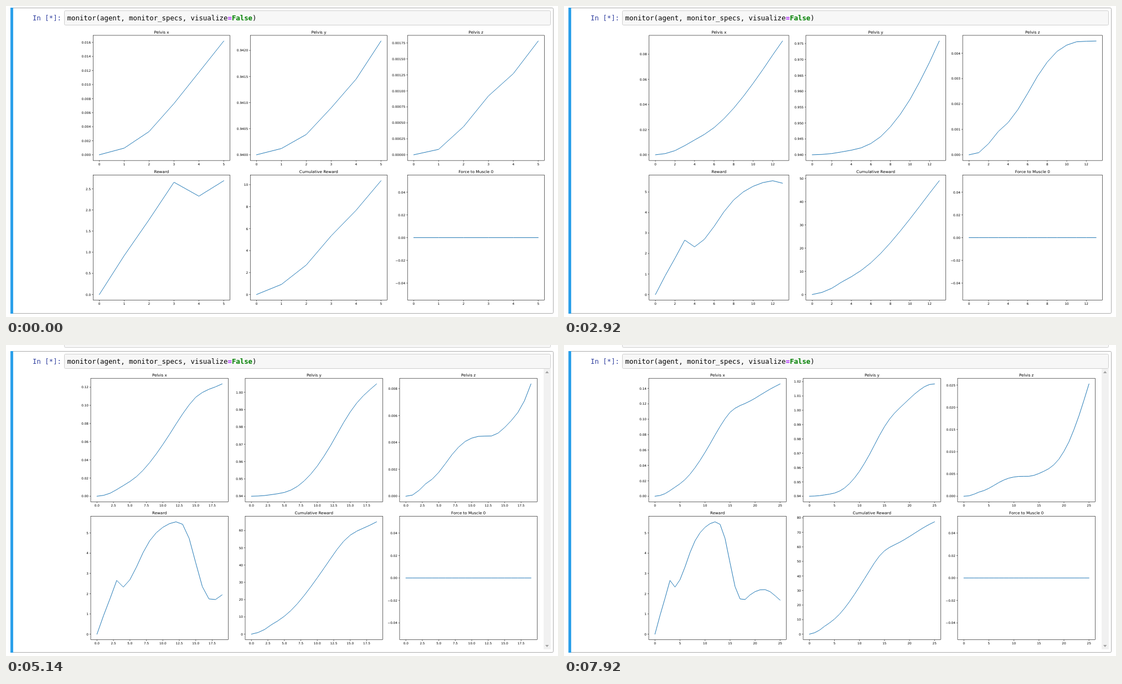
An HTML page that plays this animation: 997x562 px, repeating every 8 s.

```html
<!DOCTYPE html>
<html lang="en">
<head>
<meta charset="utf-8">
<title>Training monitor</title>
<style>
  html, body { margin: 0; width: 100%; height: 100%; overflow: hidden; background: #fff; }
  svg { display: block; width: 100%; height: 100%; }
  .code { font: 12.35px "DejaVu Sans Mono", monospace; white-space: pre; }
  .kw { font-weight: bold; }
  .plot { font-family: "DejaVu Sans", sans-serif; }
  .axes { fill: none; stroke: #000; stroke-width: .6; }
  .line { fill: none; stroke: #1f77b4; stroke-width: 1; stroke-linejoin: round; stroke-linecap: square; }
</style>
</head>
<body>
<svg id="stage" viewBox="0 0 997 562"></svg>
<script>
const LOOP = 8000, FIRST = 5;
// Moments at which one more sample arrives
const STEPS = [180, 480, 780, 1040, 1560, 2120, 2520, 2920, 3260, 3600,
  3980, 4420, 4800, 5140, 5480, 5820, 6220, 6860, 7340, 7920];

const px = [0, .95, 3.31, 7.3, 11.74, 16.2, 21.6, 28.6, 37, 46.5, 56.9, 67.9, 79.4,
  90.5, 100.6, 109, 114.2, 117.7, 120.4, 123.6, 127.2, 131.2, 135.2, 139, 142.5, 145.8].map(v => v / 1000);
const py = [0, .12, .39, .9, 1.45, 2.18, 3.55, 5.7, 8.8, 12.7, 17.4, 23, 29.1,
  35.8, 42.5, 48.6, 53.8, 58, 61.5, 64.8, 68.1, 71.3, 74.1, 76.5, 78, 78.4].map(v => .94 + v / 1000);
const pz = [0, .085, .44, .92, 1.27, 1.78, 2.42, 3.09, 3.65, 4.07, 4.32, 4.45, 4.47,
  4.48, 4.69, 5.11, 5.62, 6.22, 7.09, 8.35, 10.1, 12.24, 15, 18.1, 21.6, 25.25].map(v => v / 1000);
const reward = [0, .92, 1.77, 2.655, 2.325, 2.69, 3.32, 4.03, 4.61, 5.01, 5.28, 5.46, 5.55,
  5.43, 4.73, 3.52, 2.35, 1.74, 1.71, 1.94, 2.1, 2.19, 2.2, 2.1, 1.9, 1.68];
let sum = 0;
const total = reward.map(v => sum += v);

const PLOTS = [
  ["Pelvis x", px], ["Pelvis y", py], ["Pelvis z", pz],
  ["Reward", reward], ["Cumulative Reward", total], ["Force to Muscle 0", reward.map(() => 0)]
];

const f = v => +v.toFixed(2);
const rect = (x, y, w, h, attrs) => `<rect x="${f(x)}" y="${f(y)}" width="${f(w)}" height="${f(h)}" ${attrs}/>`;
const text = (x, y, size, anchor, s) =>
  `<text x="${f(x)}" y="${f(y)}" font-size="${f(size)}" text-anchor="${anchor}">${s}</text>`;

// Limits with a 5% margin and at most nine round intervals
function makeAxis(values) {
  let lo = Math.min(...values), hi = Math.max(...values);
  if (lo === hi) { lo -= .05; hi += .05; }
  const pad = (hi - lo) * .05;
  lo -= pad; hi += pad;
  const raw = (hi - lo) / 9, mag = 10 ** Math.floor(Math.log10(raw));
  const step = mag * [1, 2, 2.5, 5, 10].find(m => m * mag >= raw);
  let digits = 0;
  while (Math.abs(step * 10 ** digits - Math.round(step * 10 ** digits)) > 1e-6) digits++;
  const ticks = [];
  for (let k = Math.ceil(lo / step - 1e-9); k <= Math.floor(hi / step + 1e-9); k++) {
    const label = Math.abs(k * step).toFixed(digits);
    ticks.push({ v: k * step, label: k < 0 ? "\u2212" + label : label });
  }
  return { lo, hi, ticks, at: v => (v - lo) / (hi - lo) };
}

const labelWidth = s => [...s].reduce((w, c) => w + (c === "." ? 1.8 : c === "\u2212" ? 4.9 : 3.6), 0);
const widest = axes => Math.max(...axes.flatMap(a => a.ticks.map(t => labelWidth(t.label))));

function drawPlot(title, data, xs, ys, box, k) {
  const { x, y, w, h } = box, base = y + h, size = 5.8 * k;
  const X = v => x + w * xs.at(v), Y = v => base - h * ys.at(v);
  let marks = "", out = "";
  for (const t of xs.ticks) {
    marks += `M${f(X(t.v))} ${f(base)}v${f(2.07 * k)}`;
    out += text(X(t.v), base + 8.7 * k, size, "middle", t.label);
  }
  for (const t of ys.ticks) {
    marks += `M${f(x)} ${f(Y(t.v))}h${f(-2.07 * k)}`;
    out += text(x - 4.1 * k, Y(t.v) + 2.2 * k, size, "end", t.label);
  }
  const points = data.map((v, i) => f(X(i)) + "," + f(Y(v))).join(" ");
  return out + text(x + w / 2, y - 3.5 * k, 7.2 * k, "middle", title) +
    `<polyline class="line" points="${points}"/><path class="axes" d="${marks}"/>` +
    rect(x, y, w, h, 'class="axes"');
}

function drawCharts(n, scrolled, dy) {
  const k = scrolled ? .987 : 1;
  const right = scrolled ? 959.5 : 972.5;
  const top = scrolled ? 52.2 + dy : 53;
  const index = Array.from({ length: n + 1 }, (_, i) => i);
  const series = PLOTS.map(p => p[1].slice(0, n + 1));
  const xs = makeAxis(index), ys = series.map(makeAxis);

  const left = (scrolled ? 140.6 : 141.1) + k * widest([ys[0], ys[3]]);
  let gap = k * (13.3 + widest([ys[1], ys[2], ys[4], ys[5]]));
  // A last label that sticks out widens the gap a little
  const last = xs.ticks[xs.ticks.length - 1];
  gap += .6 * Math.max(0, labelWidth(last.label) * k / 2 - 248 * (1 - xs.at(last.v)));
  const w = (right - left - 2 * gap) / 3;

  return PLOTS.map(([title], i) => drawPlot(title, series[i], xs, ys[i], {
    x: left + (i % 3) * (w + gap),
    y: top + (i > 2 ? 252.5 * k : 0),
    w, h: 226.5 * k * .9985
  }, k)).join("");
}

function drawCell(scrolled, dy) {
  const input = 'rx="2" fill="#f7f7f7" stroke="#cfcfcf"';
  let out = "";
  if (scrolled) out += rect(105.5, -20, 878, 16.5 + dy - 0.5 , input).replace('y="-20"', `y="${-20 + .5}"`);
  out += rect(8.5, 3.5 + dy, 980, 552 - dy, 'rx="2" fill="#fff" stroke="#ababab"') +
    rect(8, 3 + dy, 5, 553 - dy, 'fill="#2ba0ea"') +
    rect(105.5, 8.5 + dy, 878, 26, input) +
    `<g class="code"><text x="100" y="${25.5 + dy}" text-anchor="end" fill="#303f9f">In [*]:</text>` +
    `<text x="110.6" y="${25.5 + dy}">monitor(agent, monitor_specs, visualize` +
    `<tspan class="kw" fill="#aa22ff">=</tspan><tspan class="kw" fill="#008000">False</tspan>)</text></g>`;
  if (scrolled) {
    out += rect(971, 35 + dy, 13, 515 - dy, 'fill="#f1f1f1"') +
      `<path fill="#a3a3a3" d="M974 ${43 + dy}h6.4l-3.2 -4zM974 542h6.4l-3.2 4z"/>`;
  }
  return out;
}

const stage = document.getElementById("stage");
let shown = -1;

function render(t) {
  const n = FIRST + STEPS.filter(s => s <= t).length;
  if (n === shown) return;
  shown = n;
  const scrolled = n >= 17;
  const dy = n < 17 ? 0 : n === 17 ? 7 : 8;
  stage.innerHTML = drawCell(scrolled, dy) + `<g class="plot">${drawCharts(n, scrolled, dy)}</g>`;
}

const start = performance.now();
function tick() {
  render((performance.now() - start) % LOOP);
  requestAnimationFrame(tick);
}
tick();
</script>
</body>
</html>
```
